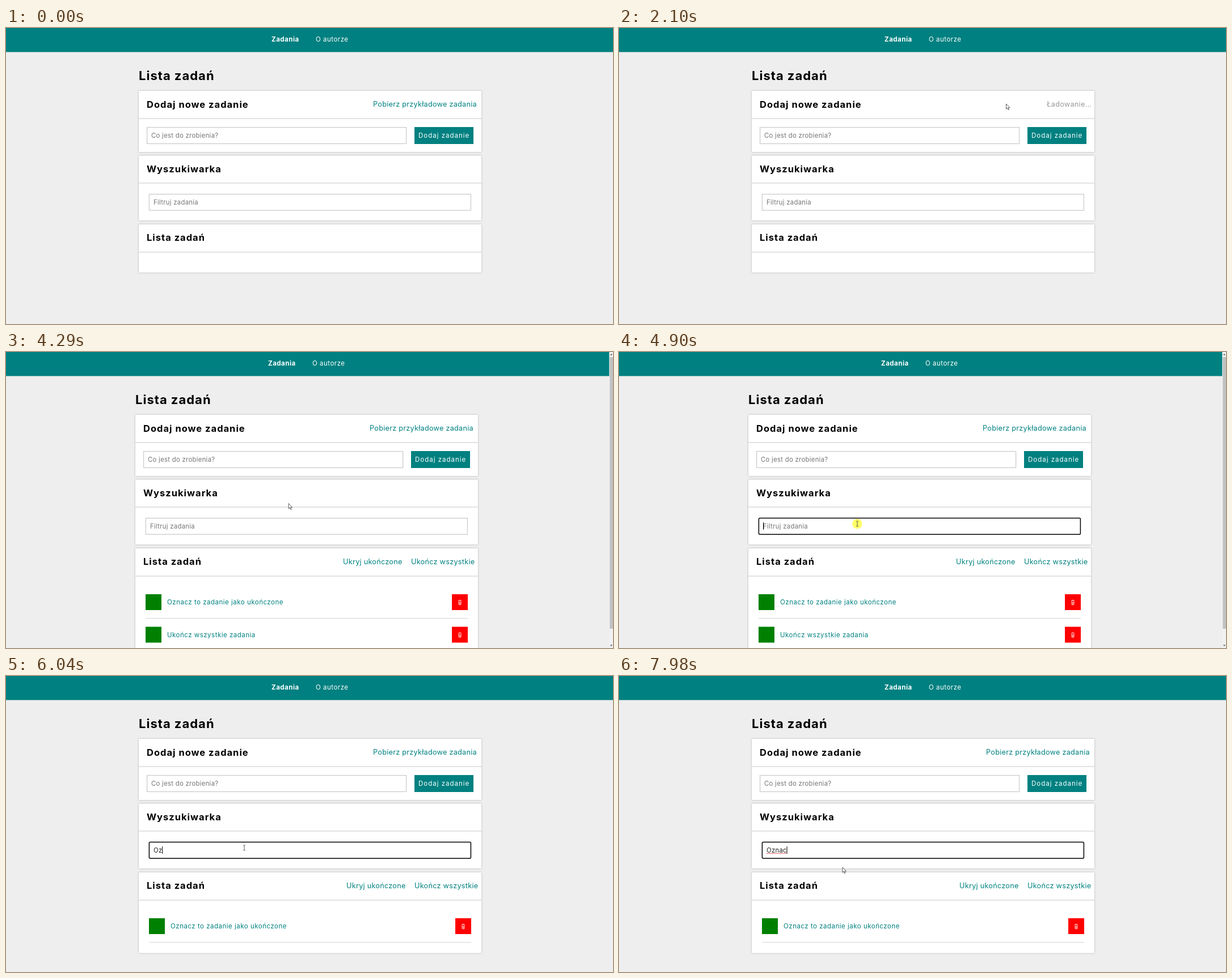
Write an HTML page that moves like this. It is 1070 px wide and 523 px high and loops after 8000 ms.

```html
<!DOCTYPE html>
<html lang="pl">
<head>
<meta charset="utf-8">
<title>Lista zadań</title>
<style>
html, body { margin: 0; width: 100%; height: 100%; overflow: hidden; background: #eee; }
svg { display: block; width: 1070px; height: 523px; font: 11.5px Inter, "Open Sans", sans-serif; letter-spacing: .5px; }
text { white-space: pre; }
.card { fill: #fff; filter: drop-shadow(0 .6px 1.4px #0004); }
.rule { fill: #ddd; }
.field { fill: #fff; stroke: #ccc; stroke-width: 1.3px; }
.teal { fill: teal; }
.white { fill: #fff; }
.h1 { font-size: 22px; font-weight: 700; letter-spacing: 1px; }
.h2 { font-size: 16.5px; font-weight: 700; letter-spacing: 1px; }
.link { font-size: 12.7px; letter-spacing: .25px; fill: teal; }
.input { font-size: 11.3px; letter-spacing: .3px; fill: #757575; }
.button { letter-spacing: 1px; }
.hover { fill: #009c9c; }
</style>
</head>
<body>
<svg viewBox="0 0 1070 523">
  <defs>
    <g id="bin">
      <rect x="792" y="428" width="28" height="28" fill="red"/>
      <path d="M803 439.3h6M804.8 438.4h2.4M803.7 440.5l.5 6.2h3.6l.5-6.2M805.2 441.3v4.4M806.8 441.3v4.4" fill="none" stroke="#ffe4e0" stroke-width=".9"/>
    </g>
  </defs>
  <rect width="1070" height="523" fill="#eee"/>
  <rect width="1070" height="42.5" class="teal"/>
  <g id="page">
    <text x="468" y="23.7" class="white" font-weight="700">Zadania</text>
    <text x="546" y="23.7" class="white">O autorze</text>
    <text x="234" y="91.5" class="h1">Lista zadań</text>

    <rect x="234" y="111" width="604" height="108" class="card"/>
    <rect x="234" y="159.2" width="604" height="1.6" class="rule"/>
    <text x="248" y="140.5" class="h2">Dodaj nowe zadanie</text>
    <text x="647" y="139.3" class="link" id="fetch">Pobierz przykładowe zadania</text>
    <text x="754" y="139.3" class="link" id="loading" style="fill:#999">Ładowanie...</text>
    <rect x="248.6" y="175.6" width="457" height="28.8" class="field"/>
    <text x="256" y="193.7" class="input">Co jest do zrobienia?</text>
    <rect x="720" y="175" width="104" height="30" class="teal"/>
    <text x="727" y="194" class="white button">Dodaj zadanie</text>

    <rect x="234" y="225.5" width="604" height="114.5" class="card"/>
    <rect x="234" y="273.2" width="604" height="1.6" class="rule"/>
    <text x="248" y="255" class="h2">Wyszukiwarka</text>
    <rect x="252.4" y="293.6" width="567" height="28.6" class="field" id="filter"/>
    <text x="260" y="311.7" class="input" id="query"></text>
    <path id="spell" d="M260 313.6h36" stroke="#e02020" stroke-width="1" stroke-dasharray="1.4 .7"/>
    <rect id="caret" y="301" width="1" height="13"/>

    <rect x="234" y="347" width="604" height="85" class="card" id="list"/>
    <rect x="234" y="395.2" width="604" height="1.6" class="rule"/>
    <text x="248" y="376" class="h2">Lista zadań</text>
    <g id="tasks">
      <text x="600" y="375" class="link">Ukryj ukończone</text>
      <text x="720" y="375" class="link">Ukończ wszystkie</text>
      <rect x="252" y="428" width="28" height="28" fill="green"/>
      <text x="290" y="445.7" class="teal" id="task">Oznacz to zadanie jako ukończone</text>
      <use href="#bin"/>
      <rect x="252" y="469.9" width="568" height="1.4" class="rule"/>
    </g>
    <g id="second">
      <rect x="252" y="485.5" width="28" height="28" fill="green"/>
      <text x="290" y="503.5" class="teal">Ukończ wszystkie zadania</text>
      <use href="#bin" y="57.5"/>
    </g>
  </g>
  <g id="scroll">
    <rect x="1063.3" width="6.7" height="523" fill="#f1f1f1"/>
    <rect x="1064.3" y="9" width="5.7" height="480" fill="#c1c1c1"/>
    <path d="M1065 5.5l2-2.5 2 2.5zM1065 517.5l2 2.5 2-2.5z" fill="#505050"/>
  </g>
  <g id="status">
    <path d="M0 511h353q2 0 2 2v10H0z"/>
    <text x="-1" y="520.8" class="white" font-size="7.5" letter-spacing="0" style="font-family:'Noto Sans',sans-serif;letter-spacing:0">Łączę...</text>
  </g>
  <g id="pointer">
    <circle id="click" r="8.7" fill="#ffff50" opacity=".85"/>
    <path id="arrow" d="M0 0V9.2L2.1 7.3 3.6 10.7 5 10.1 3.6 6.8H6.4Z" fill="#fff" stroke="#333" stroke-width=".8"/>
    <path id="hand" d="M-1 8V.8Q0-.8 1 .8V5L4.5 5.8Q5.3 6.2 5.1 8L4 12.7H-.6L-3.4 8.2Q-3.2 6.6-1 8.4Z" fill="#fff" stroke="#333" stroke-width=".8"/>
    <path id="beam" d="M-2-4.5H-.5L0-4 .5-4.5H2M0-4V4M-2 4.5H-.5L0 4 .5 4.5H2" fill="none" stroke="#333" stroke-width=".8"/>
  </g>
</svg>
<script>
const LOOP = 8000;
const $ = id => document.getElementById(id);
const show = (id, on) => { $(id).style.display = on ? '' : 'none'; };

// first step, last step, number of steps, then a quadratic curve: start, control, end
const moves = [
  [450, 1080, 10, [1030, 530], [830, 385], [657, 249]],
  [1280, 2020, 11, [657, 249], [658, 180], [682.5, 134]],
  [3620, 4360, 12, [682.5, 134], [610, 215], [446, 294]],
  [4430, 4700, 4, [446, 294], [430, 300], [420, 303.5]],
  [6960, 7710, 11, [420, 303.5], [16, 430], [296, 484]],
  [7780, 7980, 4, [296, 484], [345, 411], [394, 338]]
];
const typing = [[5700, 'O'], [6040, 'Oz'], [6140, 'Ozn'], [6230, 'Ozna'], [6430, 'Oznac']];

// hot areas: left, top, right, bottom
const fields = [[248, 175, 706, 205], [252, 293, 820, 323]];
const fetchArea = [647, 127, 831, 144];
const taskArea = [290, 434, 495, 449];
const inside = ([x, y], [l, t, r, b]) => x >= l && x <= r && y >= t && y <= b;

function pointerAt(t) {
  const move = moves.filter(m => t >= m[0]).pop();
  if (!move) return null;
  const [from, to, n, a, c, b] = move;
  const step = Math.floor((t - from) / (to - from) * (n - 1) + 1e-6) + 1;
  const u = Math.min(step / n, 1), v = 1 - u;
  return a.map((p, i) => v * v * p + 2 * u * v * c[i] + u * u * b[i]);
}

function draw(t) {
  const loaded = t >= 3620, loading = t >= 2100 && !loaded;
  const long = loaded && t < 6040;
  const shift = long ? -6 : 0;
  $('page').setAttribute('transform', `translate(${shift})`);
  show('fetch', !loading);
  show('loading', loading);
  show('tasks', loaded);
  show('second', long);
  show('scroll', long);
  show('status', t >= 5780 && t < 6040);
  $('list').setAttribute('height', long ? 200 : loaded ? 142.5 : 85);

  const focused = t >= 4900;
  const typed = typing.filter(k => t >= k[0]).pop();
  const query = $('query');
  query.textContent = typed ? typed[1] : 'Filtruj zadania';
  query.style.fill = typed ? '#222' : '';
  $('filter').style.cssText = focused ? 'stroke:#000;stroke-width:1.5px;rx:2px' : '';
  const lastKey = typed ? typed[0] : 4900;
  show('caret', focused && Math.floor((t - lastKey) / 530) % 2 === 0);
  $('caret').setAttribute('x', 260 + (typed ? query.getComputedTextLength() - .3 : 0));
  show('spell', t >= 6960);

  const at = pointerAt(t);
  show('pointer', at);
  let shape = 'arrow', overFetch = false, overTask = false;
  if (at) {
    const local = [at[0] - shift, at[1]];
    overFetch = !loading && inside(local, fetchArea);
    overTask = loaded && inside(local, taskArea);
    if (fields.some(f => inside(local, f))) shape = 'beam';
    else if (overFetch || overTask) shape = 'hand';
    $('pointer').setAttribute('transform', `translate(${at})`);
  }
  for (const id of ['arrow', 'hand', 'beam']) show(id, id === shape);
  show('click', t >= 2020 && t < 2100 || t >= 4900 && t < 4970);
  $('fetch').classList.toggle('hover', overFetch && !loaded);
  $('task').classList.toggle('hover', overTask);
}

const begin = performance.now();
function tick() {
  draw((performance.now() - begin) % LOOP);
  requestAnimationFrame(tick);
}
tick();
</script>
</body>
</html>
```
